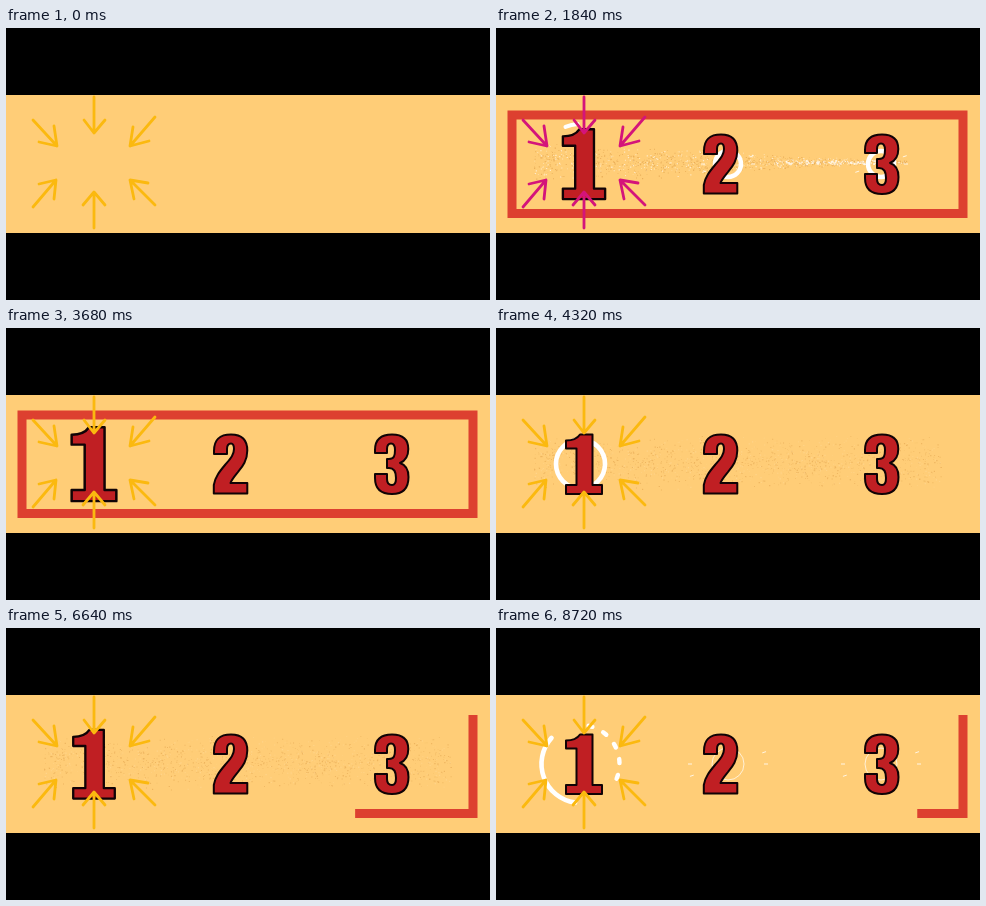
These frames come from a looping animation (484 px wide and 272 px high, 8.8 s). An HTML page:

```html
<!DOCTYPE html>
<html lang="en">
<head>
<meta charset="utf-8">
<title>1 2 3</title>
<style>
html, body { margin: 0; width: 100%; height: 100%; overflow: hidden; background: #000; }
svg { display: block; width: 100%; height: 100%; }
.line { fill: none; stroke: #fff; }
.digit { fill: #c01f23; stroke: #100306; stroke-width: 2; stroke-linejoin: round; }
</style>
</head>
<body>
<svg viewBox="0 0 484 272" role="img" aria-label="1 2 3">
  <rect width="484" height="272" fill="#000"/>
  <rect y="67" width="484" height="138" fill="#ffcd77"/>
  <path id="border" d="M467 87V185.5H16V87Z" fill="none" stroke="#dd4030" stroke-width="9"/>
  <path id="dustDark" fill="#e3a650"/>
  <path id="dustLight" fill="#fff"/>
  <path id="splash" fill="#fff" opacity="0.75"/>
  <g id="ring" class="line"></g>
  <g id="bursts" class="line"></g>
  <path id="squares" class="line" stroke-width="0.8"/>
  <g id="digits">
    <path id="one" class="digit" d="M70 112.5C76 112.5 81 111 84 106.5H96.5V157H106V166H70V157H80.5V120.5H70Z"/>
    <path class="digit" d="M208 126V123C208 111 214 106.5 225 106.5C236 106.5 241.3 112.5 241.3 122.5C241.3 133 236 139 232 144C228 149 225.5 152 224.5 155H241.3V165.5H207.8V157C209 149 214 143 219 137C224 131 228 127 228 121C228 117 227 115.5 225 115.5C222 115.5 221 118 221 121V126Z"/>
    <path class="digit" d="M369 125V122C369 112 375 106.5 386 106.5C397 106.5 402.3 112 402.3 121C402.3 129 399 133 394 135C400 137 402.5 142 402.5 149C402.5 160 397 166 386 166C374 166 369 160 369 150V146H381V151C381 155 383 157 386 157C389 157 390 155 390 150C390 143 388 140 383 140H381V131H383C388 131 389 128 389 122C389 118 388 115.5 385 115.5C382 115.5 381 118 381 121V125Z"/>
  </g>
  <path id="arrows" fill="none" stroke-width="2.8" stroke-linecap="round" stroke-linejoin="round"
    d="M88 69V105M78 92L88 105L99 92M88 200V165M77 177L88 164L99 177M27 92L51 118M33 114L51 118L48 98M149 89L124 118M127 99L124 118L143 113M27 179L50 152M33 156L50 152L48 171M149 177L124 152M128 171L124 152L142 155"/>
</svg>
<script>
const LOOP = 8800, STEP = 80;
const COLORS = ['#fbb90f', '#d4147a', '#12a3b4'];
const DRAW_STARTS = [90, 1200, 2219.5, 3300, 4380, 5440, 6577, 7640, 8678];
const PULSE = [[-1, 0], [1, .56], [3, 1], [5, .52], [6, .5], [8, 0], [10, 0]];
const $ = id => document.getElementById(id);
const clamp = (v, a = 0, b = 1) => Math.min(b, Math.max(a, v));
const lerp = (a, b, k) => a + (b - a) * clamp(k);

let seed = 7;
const rand = () => (seed = seed * 16807 % 2147483647) / 2147483647;
const specks = Array.from({ length: 1500 }, () => ({
  x: 38 + rand() * 407,
  off: rand() + rand() - 1,
  size: .5 + rand() * .8,
  light: rand() < .36
}));
const blobs = Array.from({ length: 80 }, () => ({
  x: rand() * 28, y: (rand() + rand() - 1) * 9, size: .8 + rand() * 2
}));

const dot = (x, y, s) => `M${x.toFixed(1)} ${y.toFixed(1)}h${s.toFixed(1)}v${s.toFixed(1)}h-${s.toFixed(1)}z`;

function arc(cx, cy, r, from, to, width, dash = '') {
  const at = deg => {
    const a = deg * Math.PI / 180;
    return `${cx + r * Math.cos(a)} ${cy + r * Math.sin(a)}`;
  };
  return `<path d="M${at(from)}A${r} ${r} 0 ${to - from > 180 ? 1 : 0} 1 ${at(to)}" stroke-width="${width}" stroke-linecap="round" stroke-dasharray="${dash}"/>`;
}
const circle = (cx, cy, r, width) =>
  `<circle cx="${cx}" cy="${cy}" r="${r}" stroke-width="${width}"/>`;

function drawBorder(t) {
  const start = DRAW_STARTS.filter(s => s <= t).pop();
  const age = start === undefined ? -1 : t - start;
  const head = clamp(age / 320), tail = clamp((age - 660) / 200);
  const el = $('border');
  el.style.display = head > tail ? '' : 'none';
  el.setAttribute('stroke-dasharray',
    head === 1 && tail === 0 ? 'none' : `0 ${1099 * tail} ${1099 * (head - tail)} 1200`);
}

function drawOne(t) {
  let p = t / STEP % 11;
  if (p > 10) p -= 11;
  const i = clamp(PULSE.findIndex(k => k[0] >= p), 1, PULSE.length - 1);
  const [a, b] = [PULSE[i - 1], PULSE[i]];
  const s = 1 + .31 * lerp(a[1], b[1], (p - a[0]) / (b[0] - a[0]));
  $('one').setAttribute('transform', `translate(88 136.5) scale(${s}) translate(-88 -136.5)`);
}

function drawDust(t) {
  const p = t % 1160;
  const head = 30 + (p - 605) / 75 * 380;
  let dark = '', light = '', splash = '';
  if (p > 605 && p < 1000) {
    for (const d of specks) {
      const age = (head - d.x) / 380 * 75;
      if (age < 0) continue;
      const spread = 2 + 26 * (1 - Math.exp(-((age / 58) ** 1.6)));
      const mark = dot(d.x, 134 + d.off * spread, d.size);
      if (d.light) light += mark; else dark += mark;
    }
    // The streak behind the head bursts when it reaches the end.
    const flying = p < 700;
    if (p < 760) {
      const x = flying ? head - 130 : 403;
      for (const d of blobs)
        splash += flying ? dot(x + d.x * 3.6, 134 + d.y * .3, d.size * .7) : dot(x + d.x, 134 + d.y, d.size);
    }
  }
  $('dustDark').setAttribute('d', dark);
  $('dustLight').setAttribute('d', light);
  $('splash').setAttribute('d', splash);
  $('dustDark').setAttribute('opacity', lerp(.75, 0, (p - 800) / 200));
  $('dustLight').setAttribute('opacity', lerp(.6, .14, (p - 700) / 140) * clamp((1000 - p) / 100));
}

function drawRing(t) {
  const p = t % 1072, flip = Math.floor(t / 1072) % 2;
  const cx = 84.5, cy = 136;
  let s = '';
  if (p >= 740 && p < 840) s = arc(cx, cy, 40, -112, -94, 4);
  else if (p >= 840 && p < 960) {
    s = circle(cx, cy, 18.5, 8) + arc(cx, cy, 29.5, 100, 260, 1.6) + arc(cx, cy, 29.5, -70, 70, 1.6, '22 4');
  } else if (p >= 960 || p < 80) s = circle(cx, cy, 24.5, 4.6);
  else if (p < 190) {
    s = flip
      ? arc(cx, cy, 38, -38, 28, 4.6) + arc(cx, cy, 38, 140, 206, 5, '3 10') +
        arc(cx, cy, 27, 80, 280, 2.4) + arc(cx, cy, 27, -70, 70, 2.6, '3 6')
      : arc(cx, cy, 39, 98, 222, 4.6) + arc(cx, cy, 39, -78, 30, 4.4, '4 12');
  }
  $('ring').innerHTML = s;
}

function drawBursts(t) {
  const p = t % 976;
  let s = '';
  if (p >= 830) {
    const k = clamp((p - 864) / 48);
    for (const cx of [232, 385]) {
      s += circle(cx, 136, lerp(13, 16, k), lerp(4.5, .7, k));
      for (const deg of [-18, 0, 162, 180]) {
        const a = deg * Math.PI / 180, r = lerp(23, 36, k), q = r + 4;
        s += `<path d="M${cx + r * Math.cos(a)} ${136 + r * Math.sin(a)}L${cx + q * Math.cos(a)} ${136 + q * Math.sin(a)}" stroke-width="0.8"/>`;
      }
    }
  }
  $('bursts').innerHTML = s;
}

function drawSquares(t) {
  const p = t % 820;
  let d = '';
  if (p >= 540 && p < 740) {
    const size = lerp(18, 24, (p - 580) / 20);
    for (const [x, y] of [[255, 113], [210, 160], [410, 113], [361, 159]])
      d += `M${x - size / 2} ${y - size / 2}h${size}v${size}h${-size}z`;
  }
  $('squares').setAttribute('d', d);
  $('squares').setAttribute('opacity', lerp(.7, .4, (p - 580) / 20));
}

function render(time) {
  const t = Math.floor(time % LOOP / STEP) * STEP;
  const shown = t >= STEP ? '' : 'none';
  for (const id of ['digits', 'ring', 'bursts', 'squares', 'dustDark', 'dustLight', 'splash'])
    $(id).style.display = shown;
  $('arrows').setAttribute('stroke', COLORS[Math.floor(t / 240) % 3]);
  drawBorder(t);
  drawOne(t);
  drawDust(t);
  drawRing(t);
  drawBursts(t);
  drawSquares(t);
}

const begin = performance.now();
function tick() {
  render(performance.now() - begin);
  requestAnimationFrame(tick);
}
tick();
</script>
</body>
</html>
```
